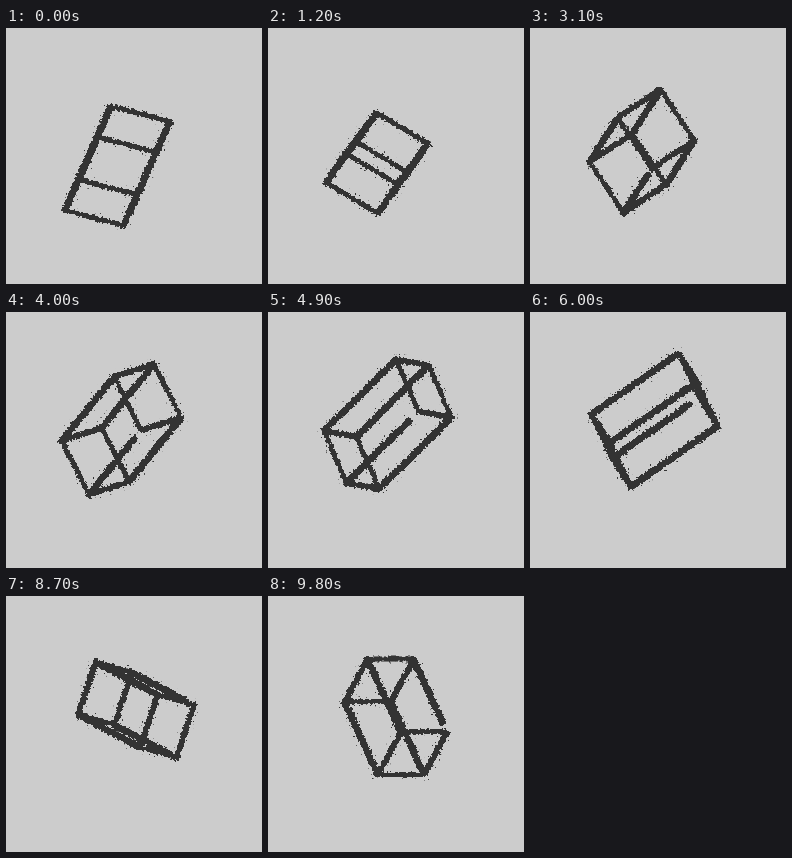
These frames come from a looping animation (256x256 px, 10000 ms). An HTML page without scripts:

```html
<!DOCTYPE html>
<html lang="en">
<head>
<meta charset="utf-8">
<title>Turning box</title>
<style>
@property --step { syntax: "<number>"; inherits: true; initial-value: 0; }
@property --held { syntax: "<number>"; inherits: true; initial-value: 0; }

html, body { margin: 0; width: 100%; height: 100%; overflow: hidden; background: #ccc; }
svg { position: absolute; width: 0; height: 0; }
.stage { position: absolute; left: 0; top: 0; width: 256px; height: 256px; overflow: hidden; filter: url(#grain); }

/* x runs along the projected spin axis, y across it */
.box {
  position: absolute; left: 128px; top: 128px; width: 0; height: 0;
  transform: rotate(31.2deg);
  animation: step 10s steps(100) infinite, held 10s infinite;
  --a: calc((38 + 2.87 * (var(--step) - var(--held))) * 1deg);
  /* centre */
  --ox: calc(-10 - 6.4 * sin(var(--a) - 46deg));
  --oy: calc(17.5 * cos(var(--a) - 46deg));
  /* long side */
  --lx: calc(33 - 37 * sin(var(--a)));
  --ly: calc(101 * cos(var(--a)));
  /* short sides */
  --bx: calc(11.5 - 19.8 * sin(var(--a) - 270deg));
  --by: calc(54 * cos(var(--a) - 270deg));
  --cx: calc(47.8 - 12.1 * sin(var(--a) - 160deg));
  --cy: calc(33 * cos(var(--a) - 160deg));
}
@keyframes step { from { --step: 0; } to { --step: 100; } }
@keyframes held {
  0% { --held: 0; animation-timing-function: steps(9); }
  99%, 100% { --held: 9; }
}

.l { --w: 7px; --ex: var(--lx); --ey: var(--ly); --px: var(--cx); --py: var(--cy); --qx: var(--bx); --qy: var(--by); }
.b { --w: 6.4px; --ex: var(--bx); --ey: var(--by); --px: var(--lx); --py: var(--ly); --qx: var(--cx); --qy: var(--cy); }
.c { --w: 5.4px; --ex: var(--cx); --ey: var(--cy); --px: var(--lx); --py: var(--ly); --qx: var(--bx); --qy: var(--by); }

i {
  --p: 1; --q: 1; --k: 1;
  position: absolute; left: 0; top: 0; height: var(--w); border-radius: 3px; background: #333;
  width: calc((var(--k) * hypot(var(--ex), var(--ey)) + 5) * 1px);
  transform:
    translate(
      calc((var(--ox) + (var(--p) * var(--px) + var(--q) * var(--qx) + (var(--k) - 1) * var(--ex)) / 2) * 1px),
      calc((var(--oy) + (var(--p) * var(--py) + var(--q) * var(--qy) + (var(--k) - 1) * var(--ey)) / 2) * 1px))
    translate(-50%, -50%)
    rotate(atan2(var(--ey), var(--ex)));
}
i:nth-child(even) { --q: -1; }
i:nth-child(n+3) { --p: -1; }
.l i:nth-child(2) { --k: .88; }
</style>
</head>
<body>
<svg aria-hidden="true">
  <filter id="grain" filterUnits="userSpaceOnUse" x="0" y="0" width="256" height="256" color-interpolation-filters="sRGB">
    <feTurbulence type="fractalNoise" baseFrequency=".42" numOctaves="1" seed="7" result="noise"/>
    <feDisplacementMap in="SourceGraphic" in2="noise" scale="5" xChannelSelector="R" yChannelSelector="G"/>
    <feColorMatrix values="0 0 0 0 .2  0 0 0 0 .2  0 0 0 0 .2  0 0 0 30 -14.5" result="ink"/>
    <feMorphology in="SourceAlpha" operator="dilate" radius="3" result="halo"/>
    <feTurbulence type="fractalNoise" baseFrequency=".55" numOctaves="1" seed="23"/>
    <feColorMatrix values="0 0 0 0 .2  0 0 0 0 .2  0 0 0 0 .2  0 0 0 40 -28.5"/>
    <feComposite in2="halo" operator="in" result="dust"/>
    <feMerge><feMergeNode in="dust"/><feMergeNode in="ink"/></feMerge>
  </filter>
</svg>
<div class="stage">
  <div class="box">
    <div class="l"><i></i><i></i><i></i><i></i></div>
    <div class="b"><i></i><i></i><i></i><i></i></div>
    <div class="c"><i></i><i></i><i></i><i></i></div>
  </div>
</div>
</body>
</html>
```
